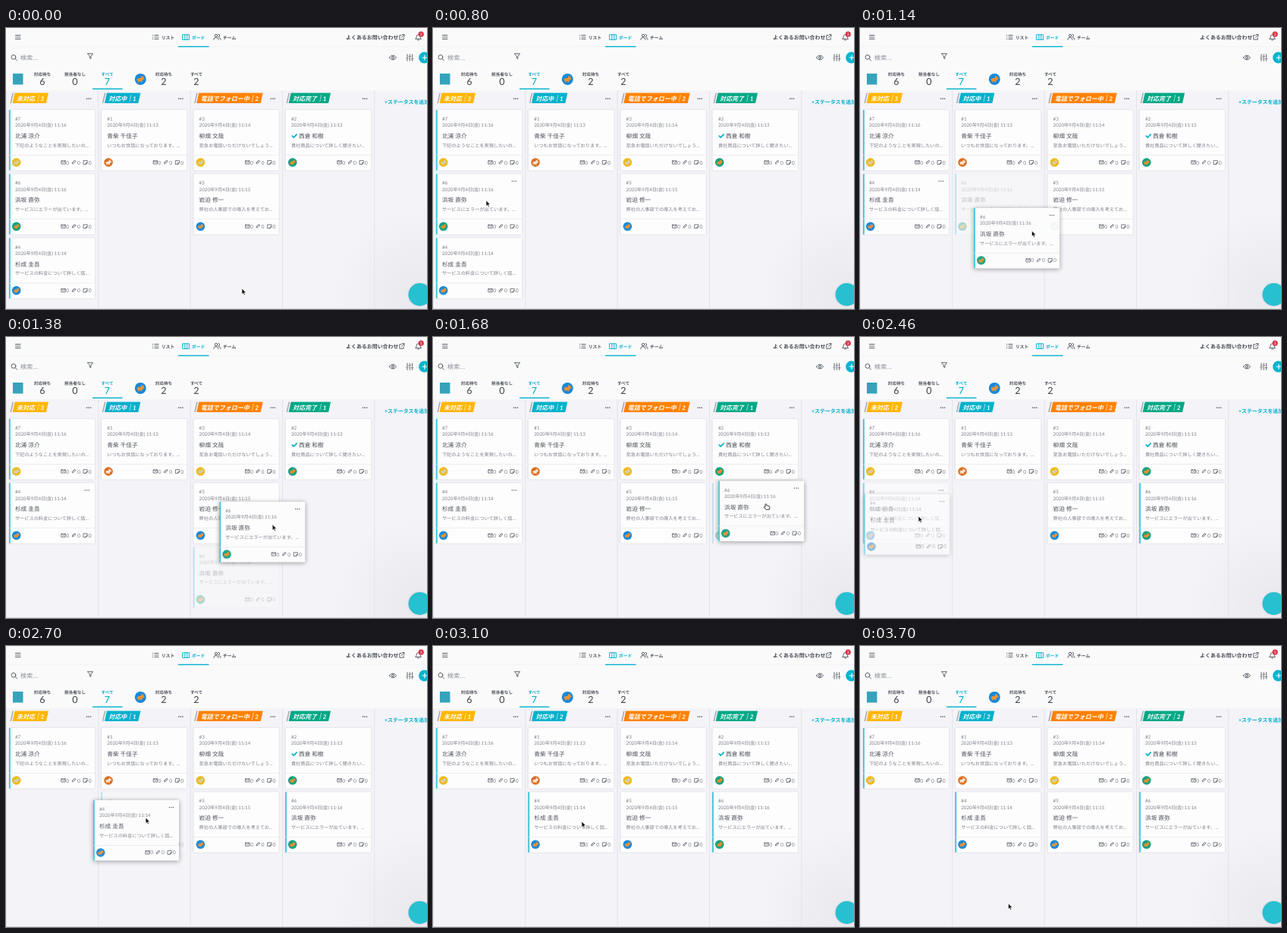
These frames come from a looping animation (555 px wide and 370 px high, 3720 ms). An HTML page:

```html
<!DOCTYPE html>
<html lang="ja">
<head>
<meta charset="utf-8">
<title>Kanban board</title>
<style>
  html, body { margin: 0; width: 100%; height: 100%; overflow: hidden; background: #fafafb; }
  svg { display: block; }
  text { font-family: Lato, "Noto Sans CJK JP", "Noto Sans CJK", sans-serif; text-rendering: geometricPrecision; white-space: pre; }
  .line { fill: none; stroke: #555b63; stroke-width: .95; stroke-linecap: round; stroke-linejoin: round; }
  .rest { filter: drop-shadow(0 .5px 1px #0002); }
  .lift { filter: drop-shadow(0 1px 3px #0006); }
</style>
</head>
<body>
<svg id="stage" width="555" height="370" viewBox="0 0 555 370"></svg>
<script>
const TEAL = '#00b1cc', INK = '#4a4f57', GRAY = '#7d8188';
const LOOP = 3720, STEP = 121.35, PITCH = 84.3;
const stage = document.getElementById('stage');
const $ = id => document.getElementById(id);

const text = (x, y, size, s, fill = INK, more = '') =>
  `<text x="${x}" y="${y}" font-size="${size}" fill="${fill}" ${more}>${s}</text>`;
const rect = (x, y, w, h, fill, more = '') =>
  `<rect x="${x}" y="${y}" width="${w}" height="${h}" fill="${fill}" ${more}/>`;
const circle = (x, y, r, fill) => `<circle cx="${x}" cy="${y}" r="${r}" fill="${fill}"/>`;
const line = (d, more = '') => `<path class="line" d="${d}" ${more}/>`;
const group = (x, y, body, more = '') => `<g transform="translate(${x} ${y})" ${more}>${body}</g>`;
const dots = (x, y, r = .85) => [-2.5, 0, 2.5].map(d => circle(x + d, y, r, '#555b63')).join('');

const SKIN = {
  yellow: ['#f0b91a', '#d3cfae'], green: ['#12a182', '#e88f2c'],
  blue: ['#1689dc', '#f0912e'], orange: ['#df6f20', '#f7e6d8']
};
const avatar = (x, y, r, skin) =>
  `<g transform="translate(${x} ${y}) scale(${r})">${circle(0, 0, 1, SKIN[skin][0])}
  <path fill="${SKIN[skin][1]}" d="M-.7 .1Q-.4-.3 .05-.2L.2-.7L.4-.35L.6-.6L.55-.25L.75-.05L.4.1Q.4.3 .2.35L.3.65L0 .42L-.3.44L-.5.65L-.45.25Z"/></g>`;

const CARDS = {
  7: ['11:16', '北浦 涼介', '下記のようなことを実現したいの...', 'yellow', 1],
  6: ['11:16', '浜坂 直弥', 'サービスにエラーが出ています。...', 'green', 1],
  4: ['11:14', '杉成 圭吾', 'サービスの料金について詳しく話...', 'blue', 1],
  1: ['11:13', '青柴 千佳子', 'いつもお世話になっております。...', 'orange'],
  3: ['11:14', '柳畑 文哉', '至急お電話いただけないでしょう...', 'yellow'],
  5: ['11:15', '岩迫 修一', '弊社の人事部での導入を考えてお...', 'blue'],
  2: ['11:13', '西倉 和樹', '貴社商品について詳しく聞きたい...', 'green']
};
const slotX = col => 4.2 + col * STEP;
const slotY = row => 108 + row * PITCH;

function cardBody(n) {
  const [time, name, note, skin, unread] = CARDS[n];
  const done = n == 2;
  return rect(0, 0, 112.8, 79.5, '#fdfdfe', 'rx="1"') +
    rect(0, 0, unread ? 1.5 : .6, 79.5, unread ? '#1cb8d1' : '#e4e4ea') +
    rect(0, 59, 112.8, .7, '#e9e9ee') +
    text(7.7, 14, 6.3, '#' + n, GRAY) +
    text(7.7, 22.4, 6.25, `2020年9月4日(金) ${time}`, GRAY) +
    (done ? line('M9 34.2l2 2l4-4', 'style="stroke:#00b1cc;stroke-width:1.7"') : '') +
    text(done ? 17.7 : 7.7, 37.2, 7.7, name, INK, 'font-weight="500"') +
    text(7.7, 48.9, 6.2, note, GRAY) +
    avatar(9.5, 69, 5.8, skin) +
    line('M69 66.8h5v4.2h-5zl2.5 2.3l2.5-2.3M83.3 69.4l2.7-2.7q1.5-.7 1.5 1l-3 3q-1.8.6-1.4-1.1l2.6-2.4M98.2 66.6h4.8v3l-1.8 1.8h-3zM103 69.6h-1.8v1.8', 'style="stroke-width:.8"') +
    [75, 89.7, 104.6].map(x => text(x, 71.5, 6.8, '0', GRAY)).join('');
}
const card = (n, col, row) => group(slotX(col), slotY(row), cardBody(n), 'class="rest"');
const movable = (id, n, cls) =>
  `<g id="${id}" class="${cls}">${cardBody(n)}<g id="${id}Dots">${dots(102.7, 9.4, .75)}</g></g>`;

const COLUMNS = [['未対応', '#ffb600'], ['対応中', '#00b1cc'], ['電話でフォロー中', '#ff8200'], ['対応完了', '#00a886']];
function column([title, color], i) {
  const end = 14 + title.length * 8;
  const slant = (a, b, fill) => `<path fill="${fill}" d="M${a + 3} 85.6H${b + 3}L${b} 99H${a}Z"/>`;
  return group(i * STEP, 0, rect(0, 82, .8, 288, '#dfdfe7') +
    slant(5.5, 7, '#a6a8ab') + slant(8.6, end + 15, color) +
    text(14, 95.5, 8, title, '#fff', 'font-weight="700" font-style="italic"') +
    `<path d="M${end + 5.6} 88l-2 9" stroke="#fff" stroke-width=".6"/>` +
    text(end + 7.6, 95.5, 8, '', '#fff', `id="count${i}" font-weight="700" font-style="italic"`) +
    dots(109, 93));
}

const stat = (x, label, value, fill = INK) =>
  text(x, 63.3, 5.6, label, fill, 'text-anchor="middle" font-weight="700"') +
  text(x, 75.4, 12.6, value, fill, 'text-anchor="middle" font-weight="500"');

const header =
  rect(0, 0, 555, 82, '#fafafb') + rect(0, 24.3, 555, .6, '#eeeef1') +
  line('M12.5 9.5h6.5M12.5 12h6.5M12.5 14.5h6.5') +
  line('M193.5 9.5h.3M193.5 12h.3M193.5 14.5h.3M196 9.5h5M196 12h5M196 14.5h5') +
  text(204.8, 14.6, 5.8, 'リスト', INK, 'font-weight="700"') +
  line('M233 8.8h8.6v6.6h-8.6zM235.9 8.8v6.6M238.8 8.8v6.6', 'style="stroke:#00b1cc"') +
  text(245, 14.6, 5.8, 'ボード', TEAL, 'font-weight="700"') + rect(227, 23.8, 40.5, 1.4, TEAL) +
  line('M274 15.5v-1q0-1.7 2-1.7h1.8q2 0 2 1.7v1M281 12.8q1.9.2 1.9 1.8v.9M280 8.4q1.7.2 1.7 1.7t-1.5 1.6') +
  '<circle class="line" cx="277" cy="10" r="1.7"/>' +
  text(286, 14.6, 5.8, 'チーム', INK, 'font-weight="700"') +
  text(448, 14.8, 6.95, 'よくあるお問い合わせ', INK, 'font-weight="700"') +
  line('M521 9.6h-2.2v5.6h5.4v-2.5M521.5 12.4l3.3-3.6M522.3 8.6h2.6v2.6') +
  line('M540 14.3q1.2-1 1.2-3q0-2.6 2.4-2.6t2.4 2.6q0 2 1.2 3zM542.7 16h1.7') +
  circle(547.2, 8.2, 3.6, '#d9344a') + text(547.2, 10, 4.8, '3', '#fff', 'text-anchor="middle"') +
  '<circle class="line" cx="10" cy="38.3" r="2.9"/>' + line('M12.2 40.6l2.3 2.4') +
  text(19, 42, 8, '検索...', '#8c9097', 'letter-spacing=".35"') +
  line('M107.6 33.8h7l-2.7 3.4v3.3l-1.6-1v-2.3z') +
  line('M505.4 39q4.6-6 9.2 0q-4.6 6-9.2 0z') + '<circle class="line" cx="510" cy="39" r="1.5"/>' +
  line('M529 34.8v4M529 41.5v1.7M532.3 34.8v1.3M532.3 38.6v4.6M535.6 34.8v4.4M535.6 41.8v1.4M527.8 40h2.4M531.1 37.3h2.4M534.4 40.6h2.4') +
  circle(551.5, 39, 7.4, '#08b4cd') + line('M549 39h6M552 36v6', 'style="stroke:#fff;stroke-width:1.2"') +
  rect(9, 60, 13.5, 14.5, '#36a3bb') +
  stat(48, '対応待ち', 6) + stat(91, '担当者なし', 0) + stat(133.5, 'すべて', 7, TEAL) +
  rect(114, 79.5, 39.5, 1.4, TEAL) + avatar(177.3, 67.4, 7.5, 'blue') +
  stat(208, '対応待ち', 2) + stat(251, 'すべて', 2);

stage.innerHTML = `<radialGradient id="glow"><stop stop-color="#223" stop-opacity=".05"/>
  <stop offset="1" stop-color="#223" stop-opacity="0"/></radialGradient>` +
  rect(0, 82, 555, 288, '#f4f3f8') + circle(545.5, 351, 115, 'url(#glow)') +
  header + COLUMNS.map(column).join('') + rect(4 * STEP, 82, .8, 288, '#dfdfe7') +
  text(499, 100.3, 6.9, '+ステータスを追加', TEAL, 'font-weight="700"') +
  card(7, 0, 0) + card(1, 1, 0) + card(3, 2, 0) + card(5, 2, 1) + card(2, 3, 0) +
  movable('slot4', 4, 'rest') + movable('slot6', 6, 'rest') +
  movable('drag4', 4, 'lift') + movable('drag6', 6, 'lift') +
  `<g class="rest">${circle(545.5, 351, 15, '#27c0d0')}</g>` + rect(0, 369.2, 555, .8, '#d5d5da') +
  '<path id="arrow" d="M0 0v7.6l1.8-1.6l1.2 2.7l1.3-.6l-1.2-2.6h2.4z" fill="#111" stroke="#fff" stroke-width=".6"/>' +
  '<path id="hand" d="M0 1.2q.8-1 1.6 0l.3 1.6l3.2.9q1 .4.8 1.6l-.6 2.9h-4.2l-2.8-3q.2-1.2 1.7-.2z" fill="#fff" stroke="#222" stroke-width=".9"/>';

// Rows are [time, x, y]; harmonic tangents give smooth travel without overshoot.
const POINTER = [[0, 311, 343], [60, 311, 343], [700, 70, 227], [900, 70, 227], [1140, 226, 267], [1680, 438, 219],
  [1850, 432, 224], [1960, 432, 224], [2340, 75, 227], [2410, 76, 229], [2460, 77, 236], [2700, 184, 226],
  [2920, 196, 226], [3050, 196, 226], [3450, 195.5, 339]];
const DRAG6 = [[900, 4.2, 192.3], [1140, 149.8, 237], [1680, 376.3, 189.5], [1900, 368.2, 192.3]];
const DRAG4 = [[2410, 4.2, 192.3], [2460, 5.4, 207], [2700, 115.1, 203], [2900, 128, 196], [3000, 125.6, 192.3]];

function along(keys, t) {
  const last = keys.length - 1;
  if (t <= keys[0][0]) return keys[0].slice(1);
  if (t >= keys[last][0]) return keys[last].slice(1);
  const i = keys.findIndex(k => k[0] > t) - 1;
  const [a, b] = [keys[i], keys[i + 1]], span = b[0] - a[0], u = (t - a[0]) / span;
  return [1, 2].map(c => {
    const slope = j => j < 0 || j >= last ? 0 : (keys[j + 1][c] - keys[j][c]) / (keys[j + 1][0] - keys[j][0]);
    const tangent = j => {
      const p = slope(j - 1), q = slope(j);
      return p * q <= 0 ? 0 : 2 * p * q / (p + q);
    };
    return a[c] + (b[c] - a[c]) * u * u * (3 - 2 * u) +
      span * u * (1 - u) * ((1 - u) * tangent(i) - u * tangent(i + 1));
  });
}
const ramp = (t, a, b) => Math.min(1, Math.max(0, (t - a) / (b - a)));
const show = (id, on) => $(id).style.display = on ? '' : 'none';
const place = (id, x, y, alpha = 1) => {
  $(id).setAttribute('transform', `translate(${x} ${y})`);
  $(id).setAttribute('opacity', alpha);
};

function moveCard(n, keys, t, homeRow) {
  const start = keys[0][0], end = keys[keys.length - 1][0], active = t > start && t < end;
  const [x, y] = along(keys, t), col = Math.floor((x + 57) / STEP);
  const lifted = ramp(t, start, start + 100);
  place('drag' + n, x, y, .95 * lifted);
  show('drag' + n, active);
  place('slot' + n, slotX(col), slotY(col == 0 ? homeRow : col == 2 ? 2 : 1), active ? 1 - .68 * lifted : 1);
}

function render(t) {
  moveCard(6, DRAG6, t, 1);
  moveCard(4, DRAG4, t, 2 - ramp(t, 1000, 1080));
  show('slot6Dots', t > 640 && t < 980);
  show('slot4Dots', t > 1040 && t < 2500);
  const first = t >= 1920, second = t >= 3020;
  [3 - first - second, 1 + second, 2, 1 + first].forEach((n, i) => $('count' + i).textContent = n);
  const grabbing = t > 1500 && t < 2000, pointer = along(POINTER, t);
  place('arrow', ...pointer);
  place('hand', ...pointer);
  show('arrow', !grabbing);
  show('hand', grabbing);
}
const begin = performance.now();
function tick() {
  render((performance.now() - begin) % LOOP);
  requestAnimationFrame(tick);
}
tick();
</script>
</body>
</html>
```
